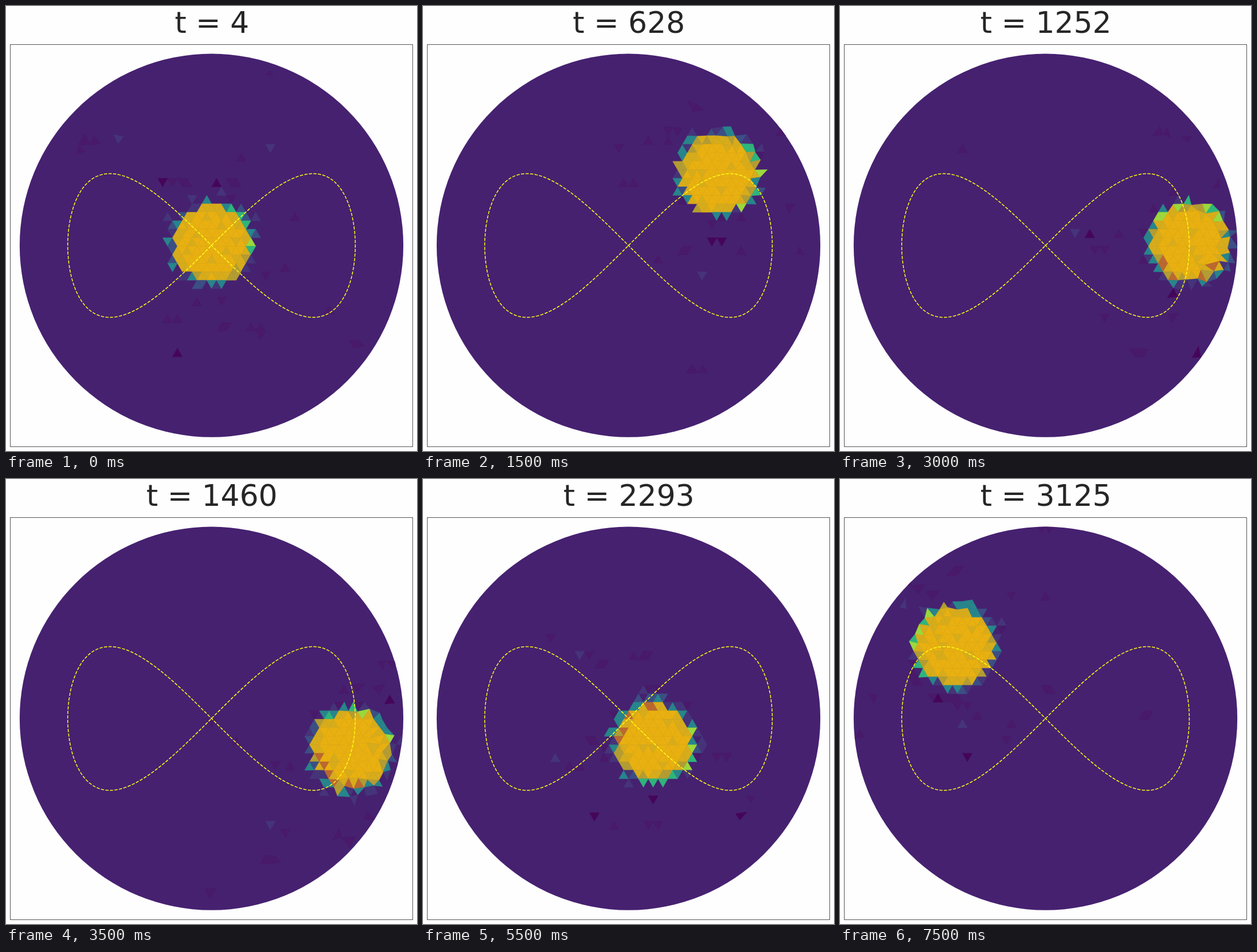
Write an HTML page with a canvas that moves like this. It is 719 px wide and 779 px high and loops after 8000 ms.

```html
<!DOCTYPE html>
<html lang="en">
<head>
<meta charset="utf-8">
<style>
  html, body { margin: 0; width: 100%; height: 100%; overflow: hidden; background: #fefefe; }
  canvas { display: block; }
</style>
</head>
<body>
<canvas id="stage" width="719" height="779"></canvas>
<script>
const ctx = document.getElementById('stage').getContext('2d');
const { sin, cos, hypot, atan2, PI } = Math;
const CX = 359.5, CY = 419.2, RADIUS = 335.6, BLOB = 67;
const SIDE = 17.13, ROW = 14.87, STEP = 500, STEPS = 16;
const BASE = '#462170', DARK = '#450659', FAINT = '#481a69',
      SLATE = '#453479', BLUE = '#3b4f84', TEAL = '#27858b', GREEN = '#2eb57b', LIME = '#9bd83c',
      GOLD = '#e8b010', AMBER = '#d7ac1b', OLIVE = '#b39c32', ORANGE = '#ba682f';

// Seeded random number in 0..1 from integers.
function hash(...parts) {
  let h = 2166136261;
  for (const p of parts) {
    h = Math.imul(h ^ (p + 977), 16777619);
    h = Math.imul(h ^ (h >>> 15), 2246822519);
  }
  return ((h ^ (h >>> 13)) >>> 0) / 4294967296;
}

const pick = (list, r) => list[Math.floor(r * list.length)];

const track = a => [CX + 251.5 * sin(a), CY - 125.8 * sin(2 * a)];

// The blob follows the track at a nearly even pace, half the figure in 12 steps.
function blobCentre(k) {
  const a = PI * k / 12;
  const [x, y] = track(a - 0.093 * sin(2 * a) - 0.062 * sin(4 * a) + 0.015 * sin(6 * a));
  return [x, y - 3];
}

// The triangle lattice is regular inside and uneven towards the rim.
function vertex(i, j) {
  const x = 359.8 + SIDE * (i + (j & 1 ? 0 : 0.5)), y = 420.6 + ROW * j;
  const uneven = 8 * Math.min(1, Math.max(0, (hypot(x - CX, y - CY) - 215) / 70));
  return [x + (hash(i, j, 1) - 0.5) * uneven, y + (hash(i, j, 2) - 0.5) * uneven];
}

function buildCells() {
  const cells = [];
  const add = (...pts) => {
    const [x, y] = [0, 1].map(n => (pts[0][n] + pts[1][n] + pts[2][n]) / 3);
    if (hypot(x - CX, y - CY) < RADIUS + 8) cells.push({ pts, x, y, id: cells.length });
  };
  for (let j = -24; j < 24; j++) {
    const shift = j & 1 ? 0 : 1;
    for (let i = -22; i < 22; i++) {
      const a = vertex(i, j), b = vertex(i + 1, j);
      const c = vertex(i + shift - 1, j + 1), d = vertex(i + shift, j + 1);
      add(a, c, d);
      add(a, b, d);
    }
  }
  return cells;
}

const cells = buildCells();

function fillCell({ pts }, color) {
  ctx.beginPath();
  for (const p of pts) ctx.lineTo(...p);
  ctx.closePath();
  ctx.fillStyle = ctx.strokeStyle = color;
  ctx.lineWidth = 0.6;
  ctx.fill();
  ctx.stroke();
}

function cellAt(x, y) {
  const dist = c => hypot(c.x - x, c.y - y);
  return cells.reduce((best, c) => dist(c) < dist(best) ? c : best);
}

// Small clumps of slightly wrong cells, mostly in a ring around the blob.
function drawOutliers(k, [bx, by]) {
  for (let n = 0; n < 26; n++) {
    const angle = 2 * PI * hash(k, n, 3);
    const far = n % 3 ? 90 + 110 * hash(k, n, 4) : 130 + 320 * hash(k, n, 4);
    const x = bx + far * cos(angle), y = by + far * sin(angle);
    if (hypot(x - CX, y - CY) > RADIUS) continue;
    const color = n % 9 === 4 ? DARK : n % 13 === 6 ? SLATE : FAINT;
    fillCell(cellAt(x, y), color);
    if (color !== FAINT) continue;
    for (const side of [-9, 9]) {
      if (hash(k, n, side) < 0.3) fillCell(cellAt(x + side, y), FAINT);
    }
  }
}

function blobColor(dist, side, late, r) {
  const edge = dist - BLOB;
  if (edge < -14) return r < 0.12 ? AMBER : GOLD;
  if (edge < 0) {
    if (late && side < -0.5 && r < 0.4) return ORANGE;
    return pick(edge < -7 ? [GOLD, AMBER, AMBER] : [AMBER, AMBER, OLIVE], r);
  }
  if (edge < 7) return pick(side > 0.45 ? [LIME, GREEN, GREEN, TEAL, TEAL] : [TEAL, TEAL, BLUE, SLATE, OLIVE], r);
  if (edge < 12) return r < 0.6 ? pick([TEAL, BLUE, SLATE, SLATE], r / 0.6) : null;
  return edge < 24 && r < 0.16 ? pick([SLATE, FAINT], r / 0.16) : null;
}

// The green rim leads at first and trails, opposite orange cells, on the way back.
function drawBlob(k, [bx, by]) {
  const [ax, ay] = blobCentre(k + 0.5);
  const late = k > 4 && k < 13;
  const rim = atan2(ay - by, ax - bx) + (late ? PI : 0);
  for (const { pts, x, y, id } of cells) {
    const dx = x - bx, dy = y - by;
    const dist = hypot(dx, dy) + 3 * (hash(id, k, 8) - 0.5);
    const color = blobColor(dist, cos(atan2(dy, dx) - rim), late, hash(id, k, 7));
    if (color) fillCell({ pts }, color);
  }
}

function drawTrack() {
  ctx.beginPath();
  for (let n = 0; n <= 400; n++) ctx.lineTo(...track(n / 200 * PI));
  ctx.strokeStyle = '#ffff14';
  ctx.lineWidth = 1.5;
  ctx.setLineDash([5.55, 2.4]);
  ctx.stroke();
  ctx.setLineDash([]);
}

function draw(k) {
  ctx.fillStyle = '#fefefe';
  ctx.fillRect(0, 0, 719, 779);
  ctx.fillStyle = '#262626';
  ctx.font = '52px "DejaVu Sans", sans-serif';
  ctx.textAlign = 'center';
  ctx.fillText('t = ' + Math.round(4 + 208.07 * k), 360.2, 47);

  ctx.save();
  ctx.beginPath();
  ctx.arc(CX, CY, RADIUS, 0, 2 * PI);
  ctx.fillStyle = BASE;
  ctx.fill();
  ctx.clip();
  const centre = blobCentre(k);
  drawOutliers(k, centre);
  drawBlob(k, centre);
  ctx.restore();

  drawTrack();
  ctx.strokeStyle = '#555';
  ctx.lineWidth = 1;
  ctx.strokeRect(7.5, 67.5, 704, 704);
}

let shown = -1;
function tick() {
  const k = Math.floor(performance.now() / STEP) % STEPS;
  if (k !== shown) draw(shown = k);
  requestAnimationFrame(tick);
}
tick();
</script>
</body>
</html>
```
